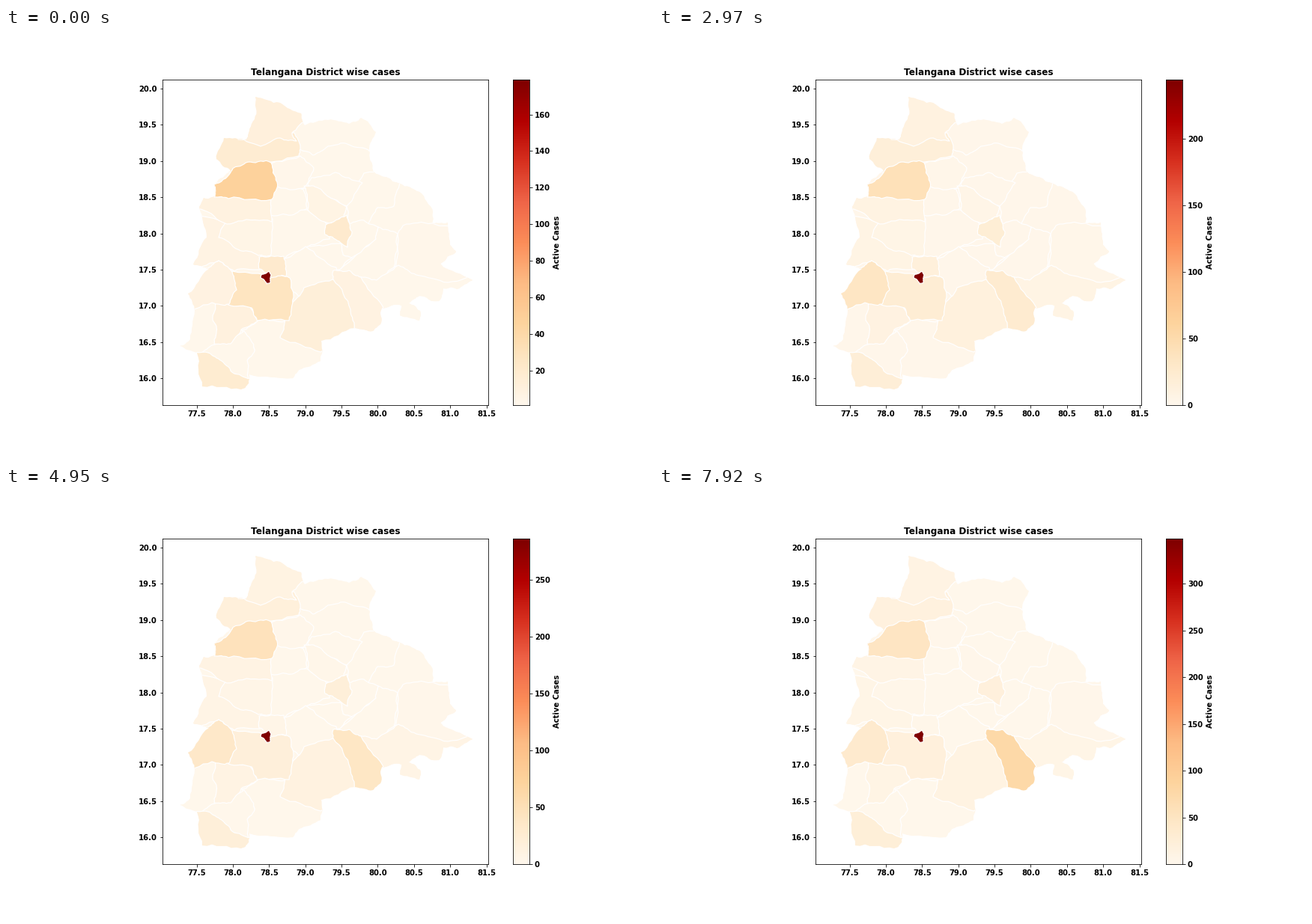
A matplotlib script for the animation above (8 s loop, 864 by 576 pixels).

```python
import numpy as np
import matplotlib.pyplot as plt
from matplotlib.animation import FuncAnimation
from matplotlib.collections import PolyCollection
from matplotlib.path import Path

W, H = 864, 576
LOOP, STEP, HOLD = 8000, 80, 990
LEFT, TOP, SIDE = 209.05, 69.12, 434.88
LON, LAT, SPAN = 77.03, 20.1235, 4.495
DAYS = range(9)

plt.rcParams.update({
    "toolbar": "None", "font.family": "DejaVu Sans", "font.size": 10,
    "font.weight": "bold", "axes.titleweight": "bold",
    "axes.labelweight": "bold", "axes.titlesize": 12,
})
rng = np.random.default_rng(7)
shapes, cases = [], []


def ragged(corners, levels=3):
    """Split each side at a displaced midpoint, then go from pixels to degrees."""
    p = np.reshape(corners, (-1, 2)).astype(float)
    for _ in range(levels):
        side = np.roll(p, -1, axis=0) - p
        length = np.hypot(*side.T)
        push = np.minimum(0.12 / np.maximum(length, 1e-9) * length, 2 / length)
        normal = side[:, ::-1] * (-1, 1)
        mid = p + side / 2 + normal * (push * rng.uniform(-1, 1, len(p)))[:, None]
        p = np.stack([p, mid], axis=1).reshape(-1, 2)
    return (p - (LEFT, TOP)) / SIDE * (SPAN, -SPAN) + (LON, LAT)


def district(active, *corners):
    """Add a district over the earlier ones; active is a count or {day: count}."""
    if not isinstance(active, dict):
        active = {0: active}
    shapes.append(ragged(corners))
    cases.append(np.interp(DAYS, list(active), list(active.values())))


# Main turns of the state border, clockwise from the northern tip
border = ragged([
    333, 92, 366, 100, 394, 114, 399, 130, 430, 123, 458, 128, 474, 120,
    494, 139, 485, 163, 490, 191, 526, 208, 552, 219, 570, 246, 569, 262,
    590, 260, 593, 290, 601, 299, 580, 315, 623, 337, 602, 349, 584, 348,
    578, 365, 552, 358, 537, 368, 553, 378, 552, 391, 526, 384, 528, 371,
    502, 374, 500, 396, 490, 405, 466, 401, 421, 418, 420, 445, 391, 457,
    383, 468, 325, 463, 324, 475, 314, 483, 262, 479, 255, 434, 232, 425,
    246, 416, 252, 378, 243, 355, 271, 322, 250, 316, 268, 280, 258, 239,
    264, 227, 280, 225, 279, 208, 300, 191, 281, 175, 291, 147, 321, 149,
    332, 122])

# Whole state, then the east
district(2, 200, 60, 650, 60, 650, 500, 200, 500)
district(2, 390, 160, 410, 170, 430, 158, 453, 154, 484, 163, 510, 200, 390, 215)
district(2, 478, 194, 540, 190, 520, 270, 460, 270, 455, 238)
district(2, 526, 205, 518, 238, 496, 240, 484, 262, 490, 320, 600, 320, 600, 200)
district(3, 523, 275, 530, 264, 569, 261, 650, 270, 640, 345, 518, 345)
district(2, 497, 266, 523, 275, 518, 320, 490, 340, 440, 330, 490, 285)
district(2, 455, 262, 478, 257, 497, 266, 494, 282, 460, 308, 440, 300)

# Centre
district(2, 400, 292, 447, 288, 450, 303, 462, 307, 447, 322, 430, 325)
district(2, 350, 245, 402, 243, 428, 262, 432, 282, 400, 293, 372, 308, 345, 308)
district(2, 372, 308, 400, 292, 441, 320, 437, 337, 398, 360, 370, 345)
district(2, 350, 225, 360, 212, 397, 216, 402, 241, 382, 250, 350, 250)
district(3, 345, 185, 393, 171, 411, 187, 397, 214, 350, 213)
district(2, 408, 200, 440, 193, 476, 207, 455, 238, 403, 210)
district({0: 6, 2: 4}, 398, 211, 415, 213, 455, 239, 451, 253, 428, 260, 403, 243)
district(20, 427, 263, 455, 250, 462, 272, 456, 293, 445, 285, 426, 276)

# South
district({0: 2, 2: 7},
         470, 333, 495, 337, 524, 317, 548, 330, 590, 340, 640, 330, 600, 400, 490, 400)
district(2, 315, 404, 335, 391, 380, 391, 435, 430, 420, 480, 322, 470, 322, 444, 332, 430)
district(13, 373, 390, 379, 372, 398, 347, 436, 336, 480, 350, 480, 420, 420, 433, 366, 414)
district({0: 8, 2: 24, 4: 24, 5: 38, 7: 44, 8: 77},
         437, 324, 458, 324, 474, 333, 503, 372, 515, 415, 466, 405, 460, 376, 437, 336)
district(2, 275, 424, 318, 405, 332, 430, 322, 444, 324, 475, 262, 434)
district({0: 18, 5: 19, 8: 25},
         240, 436, 270, 434, 288, 445, 305, 462, 330, 468, 330, 490, 240, 490)
district(10, 280, 366, 325, 372, 336, 392, 314, 403, 300, 422, 278, 422, 281, 400, 276, 390)
district({0: 27, 2: 24, 4: 18, 8: 20},
         302, 325, 372, 332, 379, 334, 384, 360, 378, 391, 335, 391, 328, 374, 297, 370)

# West and north-west
district(7, 240, 240, 300, 262, 340, 302, 339, 323, 305, 325, 284, 311, 240, 330)
district({0: 8, 2: 33, 8: 38},
         230, 325, 270, 321, 284, 311, 302, 326, 308, 350, 298, 369, 275, 367, 230, 382)
district(5, 295, 255, 284, 280, 310, 296, 337, 304, 354, 303, 356, 255)
district(9, 240, 242, 260, 242, 295, 262, 310, 258, 355, 259, 355, 220, 240, 220)
district(17, 270, 140, 385, 140, 393, 160, 391, 171, 330, 185, 300, 193, 270, 190)
district(11, 310, 149, 340, 158, 366, 147, 388, 151, 382, 140, 400, 124, 400, 80, 310, 80)
district({0: 47, 2: 39, 4: 45, 8: 50},
         278, 209, 300, 193, 304, 187, 326, 179, 354, 180, 362, 206, 355, 229, 297, 228, 278, 226)

# Capital ring and capital; the capital sets the top of the scale
district({0: 20, 2: 24, 4: 5}, 338, 306, 371, 305, 374, 332, 352, 334, 338, 322)
district({0: 179, 2: 249, 4: 240, 5: 286, 7: 329, 8: 348},
         341, 329, 347, 328, 351, 325, 354, 330, 353, 340, 348, 342, 345, 337, 340, 334)

cases = np.array(cases)


def add_axes(x, y, w, h):
    return fig.add_axes([x / W, 1 - (y + h) / H, w / W, h / H])


fig = plt.figure(figsize=(W / 72, H / 72), dpi=72, facecolor="white")
ax = add_axes(LEFT, TOP, SIDE, SIDE)
ax.set(xlim=(LON, LON + SPAN), ylim=(LAT - SPAN, LAT))
ax.set_title("Telangana District wise cases")
districts = PolyCollection(shapes, cmap="OrRd", edgecolors="white", linewidths=1.2)
ax.add_collection(districts, autolim=False)
districts.set_clip_path(Path(border), ax.transData)

bar = add_axes(677.16, TOP, SIDE / 20, SIDE)
scale = bar.imshow(np.linspace(0, 1, 256)[:, None], cmap="OrRd",
                   origin="lower", aspect="auto", extent=(0, 1, 0, 1))
bar.set_xticks([])
bar.yaxis.tick_right()
bar.yaxis.set_label_position("right")
bar.set_ylabel("Active Cases")


def update(i):
    # A step shows the day that has begun by its end.
    day = (i * STEP + STEP - 1) // HOLD
    low, high = (0 if day else 1), cases[-1, day]
    districts.set_array(cases[:, day])
    districts.set_clim(low, high)
    scale.set_extent((0, 1, low, high))
    bar.set_ylim(low, high)
    return districts, scale


anim = FuncAnimation(fig, update, frames=LOOP // STEP, interval=STEP,
                     repeat=True, repeat_delay=0, blit=False)
plt.show()
```
